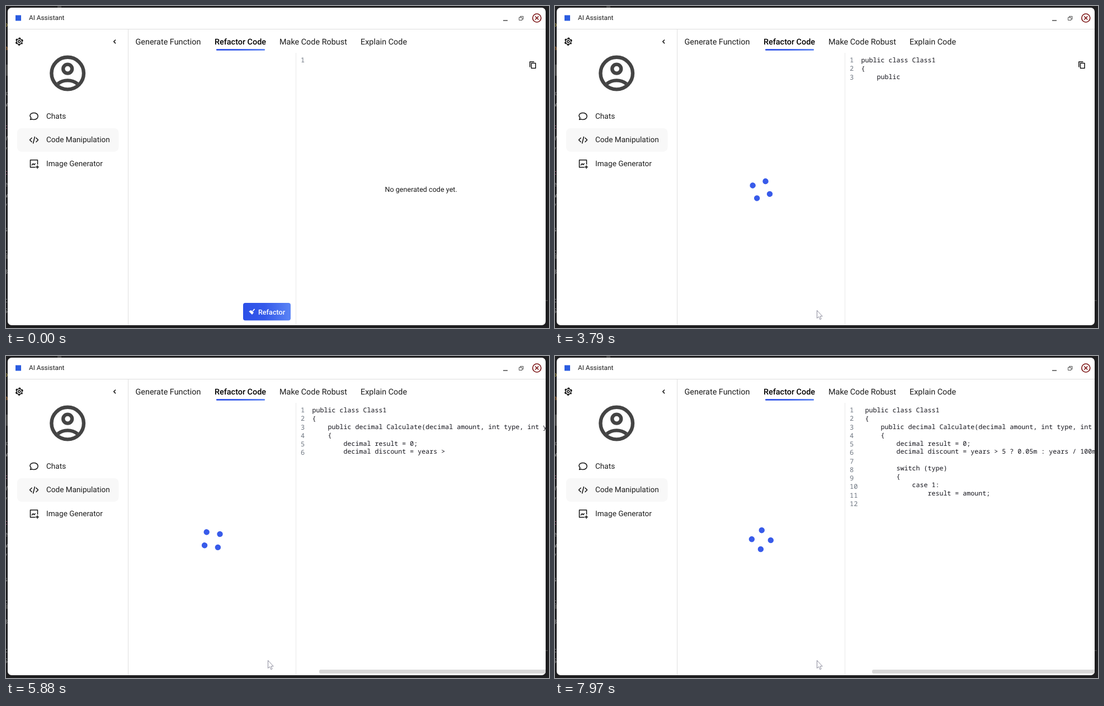
An HTML page that plays this animation: 971 px wide and 577 px high, repeating every 8000 ms.

```html
<!DOCTYPE html>
<html lang="en">
<head>
<meta charset="utf-8">
<title>AI Assistant</title>
<style>
  html, body { margin: 0; width: 100%; height: 100%; overflow: hidden; background: #1e1e20; }
  svg, pre { position: absolute; margin: 0; text-rendering: geometricPrecision; }
  #stage { position: absolute; left: 0; top: 0; width: 971px; height: 577px; overflow: hidden; }
  #stage > svg { left: 0; top: 0; font-family: Roboto, sans-serif; }
  .line { fill: none; stroke: #111; stroke-width: 1.5; stroke-linejoin: round; }
  .tab { font-size: 14.4px; }
  .menu { font-size: 13.6px; }
  .small { font-size: 12.6px; }
  #input { left: 230px; top: 95px; font: 12.6px/15.29px Roboto, sans-serif; color: #1c1c1c; }
  #numbers { left: 527px; top: 89px; font: 12px/15.25px "Noto Sans Mono", monospace; color: #6e7681; }
  #view { position: absolute; left: 519px; top: 85px; width: 446px; height: 486px; overflow: hidden; }
  #output { top: 6px; font: 11.667px/14.87px "Noto Sans Mono", monospace; color: #14141c; }
  #bar { position: absolute; right: 0; top: 477px; height: 7px; background: #d8d8d8; border-radius: 3px 0 3px 3px; }
</style>
</head>
<body>
<div id="stage">
  <svg width="971" height="577" fill="#1c1c1c">
    <defs>
      <linearGradient id="blue">
        <stop offset="0" stop-color="#2c50e8"/>
        <stop offset=".45" stop-color="#3459ea"/>
        <stop offset="1" stop-color="#5b84f5"/>
      </linearGradient>
    </defs>
    <rect width="971" height="577" fill="#1e1e20"/>
    <path d="M0 105h3v20H0zM0 445h3v8H0zM92 0h7v3h-7zM965 527h4v1.5h-4z" fill="#444"/>
    <g id="scraps" font-family="Noto Sans Mono, monospace" font-size="11"></g>
    <rect x="3" y="3" width="962" height="569" rx="7" fill="#fff"/>
    <path d="M3 41.5H965M218.5 42V572" fill="none" stroke="#dedede"/>
    <path d="M518.5 84V572" stroke="#e9e9e9"/>

    <rect x="17" y="16.5" width="10" height="10" fill="#2b5ce0"/>
    <text x="41" y="25" font-size="11.8">AI Assistant</text>
    <path d="M889 26h8" stroke="#555" stroke-width="1.6"/>
    <path d="M917.5 20.5h5.5v5h-5.5zM919.5 20v-1.5h5.5v5h-2" fill="none" stroke="#555"/>
    <g fill="none" stroke="#7c1414" stroke-width="1.6">
      <circle cx="949.3" cy="21.5" r="7.5"/>
      <path d="M946.3 18.5l6 6m0-6l-6 6"/>
    </g>

    <g class="line" transform="translate(23.7 63.7) rotate(30)">
      <circle r="5"/><circle r="2"/>
      <circle r="6" stroke-width="2.2" stroke-dasharray="3.1 3.183" stroke-dashoffset="1.55"/>
    </g>
    <path class="line" d="M196 60.5l-3.3 3.3 3.3 3.3"/>
    <g transform="translate(71.8 82.2) scale(3.2)" fill="none" stroke="#444" stroke-width="2">
      <circle cx="12" cy="12" r="9"/><circle cx="12" cy="9.5" r="2.5"/>
      <path d="M6.5 17.9Q8.900 16 12 16T17.500 17.900"/>
    </g>

    <rect x="20" y="219" width="181.5" height="42" rx="8" fill="#f8f8f8"/>
    <path class="line" d="M43.5 203.5l1.4-3.2C40.5 195.5 44.5 191.5 50 191.5c9.5 0 9.5 12 0 12q-1.8 0-3.2-.7z"/>
    <path class="line" d="M46.5 236l-4 4 4 4M53.5 236l4 4-4 4M51.5 234l-3 12.5"/>
    <path class="line" d="M52.5 289H43.5V276H56.5v8M46 285.5l2.5-3 2 2 2-2.5M56 285.5v6M53 288.5h6"/>
    <g class="menu">
      <text x="72" y="201.500">Chats</text>
      <text x="72" y="244">Code Manipulation</text>
      <text x="72" y="286.500">Image Generator</text>
    </g>

    <g class="tab">
      <text x="231.5" y="68.700">Generate Function</text>
      <text x="373" y="68.700" font-weight="500" fill="#000">Refactor Code</text>
      <text x="489" y="68.700">Make Code Robust</text>
      <text x="634" y="68.700">Explain Code</text>
    </g>
    <rect x="376" y="77" width="87" height="2.7" rx="1" fill="url(#blue)"/>
    <path id="copy" class="line" d="M939.5 102.5h7.5v9h-7.5zM936.8 109.5V100h7.7" stroke-width="1.3"/>
    <text id="empty" class="small" x="677.5" y="332.7">No generated code yet.</text>
    <g id="button">
      <rect x="424" y="532" width="85" height="31.5" rx="4" fill="url(#blue)"/>
      <path d="M444.5 543l-3.5 4" stroke="#fff" stroke-width="1.8"/>
      <path d="M438 545l5 4.3-3 3.7-5.7-5.7z" fill="#fff"/>
      <text class="small" x="451" y="552.5" font-weight="500" fill="#fff">Refactor</text>
    </g>
    <g id="loader" fill="#385bea"></g>
  </svg>
  <pre id="input"></pre>
  <pre id="numbers"></pre>
  <div id="view"><pre id="output"></pre><div id="bar"></div></div>
  <svg width="971" height="577">
    <path id="caret" d="M233.5 539.5v14" stroke="#000"/>
    <g id="mouse">
      <path id="beam" d="M-3-6.5h2.5l.5.5.5-.5H3M-3 6.5h2.5l.5-.5.5.5H3M0-6V6" fill="none" stroke="#222"/>
      <path id="arrow" d="M0 0V14l3.1-2.8 2.2 5 2.3-1-2.2-4.7H9.7z" fill="#fff" stroke="#8c8c9c"/>
    </g>
  </svg>
</div>
<script>
const $ = id => document.getElementById(id);
const LOOP = 8000, PASTE = 900, CLICK = 2800;

const inputCode = `public class Class1
{
  public decimal Calculate(decimal amount, int
type, int years)
  {
    decimal result = 0;
    decimal disc = (years > 5) ? (decimal)5/100 :
(decimal)years/100;
    if (type == 1)
    {
      result = amount;
    }
    else if (type == 2)
    {
      result = (amount - (0.1m * amount)) - disc *
(amount - (0.1m * amount));
    }
    else if (type == 3)
    {
      result = (0.7m * amount) - disc * (0.7m *
amount);
    }
    else if (type == 4)
    {
      result = (amount - (0.5m * amount)) - disc *
(amount - (0.5m * amount));
    }
    return result;
  }
}`;

const outputCode = `public class Class1
{
    public decimal Calculate(decimal amount, int type, int years)
    {
        decimal result = 0;
        decimal discount = years > 5 ? 0.05m : years / 100m;

        switch (type)
        {
            case 1:
                result = amount;
`;
const tokens = outputCode.match(/\s*\w+|\s*[^\w\s]\n*/g);

// Each row is a time followed by values.
const typing = [[3340, 0], [4480, 14], [5170, 21], [6090, 31], [6730, 37], [7900, 50]];
const spin = [[2940, -1], [4550, 222], [5180, 312], [6760, 541], [7970, 723], [8000, 727]];
const moves = [[410, 420, 590], [900, 350, 194.5], [1580, 350, 194.5], [2330, 462, 536], [2600, 468.5, 545.5]];

const clamp = v => Math.max(0, Math.min(1, v));
const smooth = p => p * p * (3 - 2 * p);

function at(keys, t, ease = p => p) {
  const i = Math.max(1, keys.findIndex(k => k[0] > t));
  const [a, b] = t >= keys.at(-1)[0] ? keys.slice(-2) : [keys[i - 1], keys[i]];
  const p = ease(clamp((t - a[0]) / (b[0] - a[0])));
  return a.slice(1).map((v, n) => v + (b[n + 1] - v) * p);
}

const show = (id, on) => { $(id).style.display = on ? '' : 'none'; };

$('scraps').innerHTML = [
  ['o', 37, '#a89a40'], ['n', 79, '#c07a30'], ['x', 160], ['w', 180], ['c', 220, '#b06080'],
  ['V', 241], ['/', 261], ['c', 302, '#b06080'], ['e', 323], ['w', 343], ['/', 362],
  ['s', 404], ['c', 444], ['3', 480], ['t', 531], ['S', 550]
].map(([c, y, fill = '#909090']) => `<text x="-3.5" y="${y}" fill="${fill}">${c}</text>`).join('');
$('loader').innerHTML = [0, 90, 180, 270]
  .map(a => `<circle r="5.2" cy="-17" transform="rotate(${a})"/>`).join('');
$('input').textContent = inputCode;

function draw(t) {
  const pasted = t >= PASTE && t < CLICK;
  show('input', pasted);
  show('caret', pasted && (t < 2110 || t > 2640));
  show('button', t < CLICK);

  const [x, y] = at(moves, t, smooth);
  const arrow = y > 525;
  show('mouse', t >= 410);
  show('arrow', arrow);
  show('beam', !arrow);
  $('mouse').setAttribute('transform', `translate(${x} ${y})`);

  $('loader').setAttribute('opacity', clamp((t - 2880) / 400));
  $('loader').setAttribute('transform', `translate(368.8 329.2) rotate(${at(spin, t)[0]})`);

  const count = Math.floor(at(typing, t)[0] + 1e-6);
  const typed = tokens.slice(0, count).join('');
  const rows = typed.split('\n');
  const wide = rows.length > 9 ? 7 : 0;
  const overflow = rows.some(r => r.length > 59);
  $('output').textContent = typed;
  $('output').style.left = 28.5 + wide + 'px';
  $('numbers').textContent = rows.map((_, i) => i + 1).join('\n');
  $('bar').style.left = 41 + wide + 'px';
  show('bar', overflow);
  show('copy', !overflow);
  show('empty', count === 0);
}

const start = performance.now();
function tick() {
  draw((performance.now() - start) % LOOP);
  requestAnimationFrame(tick);
}
tick();
</script>
</body>
</html>
```
